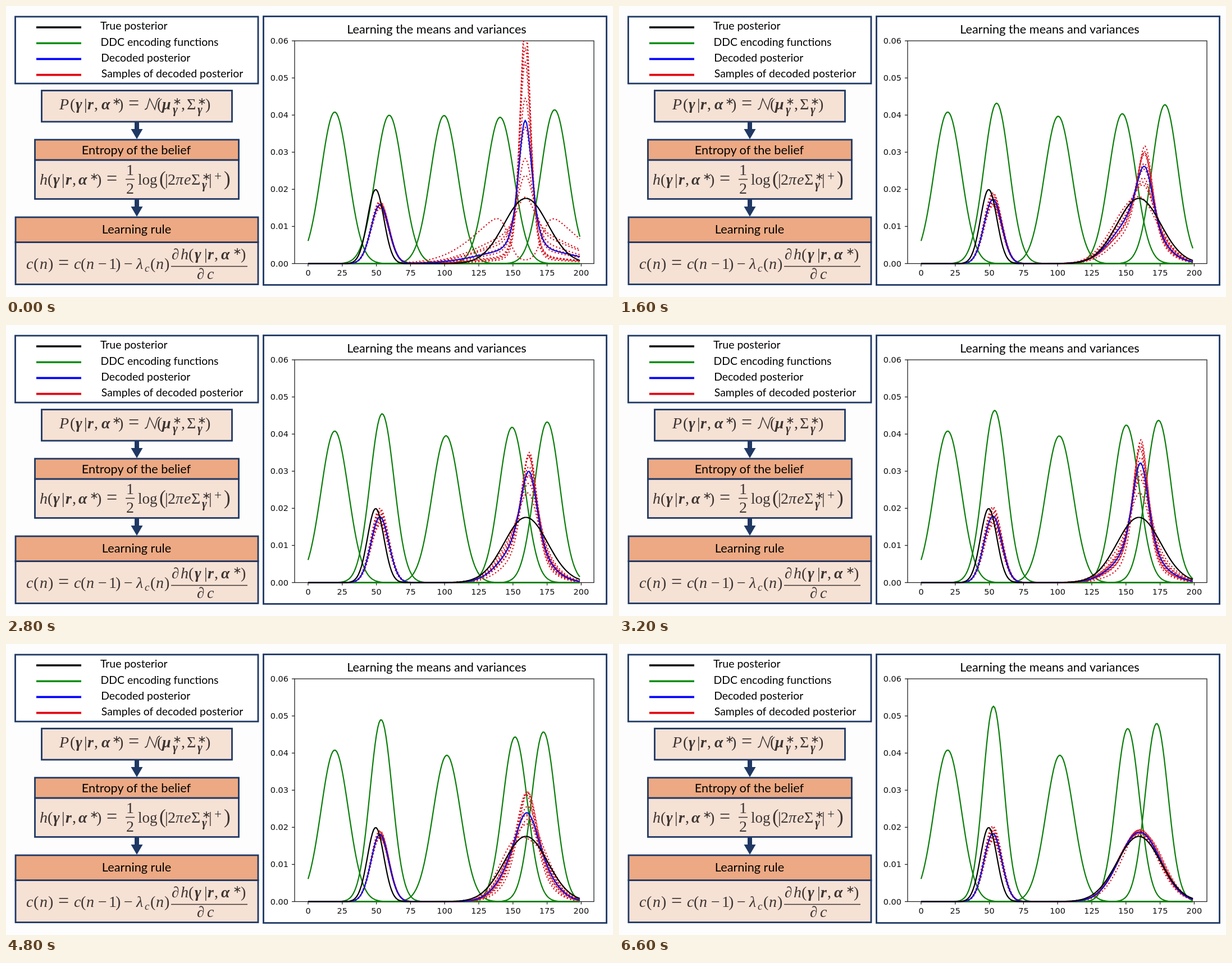
Recreate the animation shown at these times as an HTML page. Size 1081 px wide and 518 px high, loop 6.8 s.

```html
<!DOCTYPE html>
<html lang="en">
<head>
<meta charset="utf-8">
<title>Learning the means and variances</title>
<style>
  html, body { margin: 0; width: 100%; height: 100%; overflow: hidden; background: #fdfdfd; }
  svg { display: block; width: 100%; height: 100%; }
  .box { stroke: #1f3864; stroke-width: 2.8; }
  .pale { fill: #f6e1d5; }
  .head { fill: #eca983; }
  .label { font-family: Lato, sans-serif; font-size: 19.4px; }
  .title { font-family: Lato, sans-serif; font-size: 21.7px; text-anchor: middle; }
  .tick { font-family: "DejaVu Sans", sans-serif; font-size: 14.5px; fill: #111; }
  .math { font-family: "Liberation Serif", serif; fill: #3b3431; }
  .i { font-style: italic; }
  .b { font-style: italic; font-weight: bold; }
  .axis { fill: none; stroke: #222; stroke-width: 1.3; }
  .rule { fill: none; stroke: #3b3431; stroke-width: 1.5; }
  #curves path { fill: none; stroke-width: 2.2; stroke-linejoin: round; }
</style>
</head>
<body>
<svg id="stage" viewBox="0 0 1081 518" preserveAspectRatio="none">
  <defs><clipPath id="plotArea"><rect x="514" y="62" width="533" height="398"/></clipPath></defs>
  <rect class="box" x="16.5" y="19" width="432.5" height="119" fill="#fff"/>
  <rect class="box pale" x="63.5" y="150.5" width="339" height="55.5"/>
  <rect class="box pale" x="51.5" y="274" width="363" height="69.5"/>
  <rect class="box head" x="51.5" y="238" width="363" height="36"/>
  <rect class="box pale" x="17" y="420.5" width="432" height="75"/>
  <rect class="box head" x="17" y="376" width="432" height="44.5"/>
  <rect class="box" x="458.5" y="18.5" width="611" height="478" fill="#fff"/>
  <g fill="#1f3864">
    <path id="arrow" d="M229 206h8v13h6.500l-10.500 18l-10.500 -18h6.500z"/>
    <use href="#arrow" y="138"/>
  </g>
  <text class="title" x="767" y="49">Learning the means and variances</text>
  <text class="title" x="232" y="264">Entropy of the belief</text>
  <text class="title" x="232.500" y="405">Learning rule</text>
  <path class="rule" d="M213 308.500h16M294 463.500h136"/>
  <path class="rule" stroke-width="2" d="M247 184q4 0 5-5l4-14l9 19l4-15q1-4 5-5"/>
  <g id="legend"></g>
  <g id="formulas"></g>
  <g id="axes"><rect class="axis" x="514" y="62" width="533" height="396.500"/></g>
  <g id="curves" clip-path="url(#plotArea)"></g>
</svg>
<script>
const byId = id => document.getElementById(id);

function add(parent, tag, attributes, content = "") {
  const node = document.createElementNS("http://www.w3.org/2000/svg", tag);
  for (const name in attributes) node.setAttribute(name, attributes[name]);
  node.textContent = content;
  return byId(parent).appendChild(node);
}

// Legend
[["True posterior", "#000"], ["DDC encoding functions", "#0f9018"],
 ["Decoded posterior", "#00f"], ["Samples of decoded posterior", "#e3000f"]].forEach(([name, color], row) => {
  const y = 38 + row * 28.2;
  add("legend", "path", { d: `M54 ${y}h80`, stroke: color, "stroke-width": 3.6 });
  add("legend", "text", { class: "label", x: 168 + row * 0.6, y: y + 4.4 }, name);
});

// Formulas: each piece is [x, text, style, rise, size]
function formula(baseline, pieces) {
  for (const [x, text, style = "", rise = 0, size = 28] of pieces)
    add("formulas", "text", { class: "math " + style, x, y: baseline - rise, "font-size": size }, text);
}
const star = x => [x, "∗", "", 8, 19];
const gammaSub = x => [x, "γ", "b", -7, 21];

formula(184, [
  [95, "P", "i"], [114, "("], [124, "γ", "b"], [139, "|"], [145, "r", "b"], [157, ","],
  [170, "α", "b"], star(189), [200, ")"], [218, "=", "", 0, 34],
  [269, "("], [278, "μ", "b"], star(297), gammaSub(297), [312, ","],
  [322, "Σ"], star(341), gammaSub(341), [355, ")"]
]);
formula(318, [
  [60, "h", "i"], [74, "("], [84, "γ", "b"], [99, "|"], [106, "r", "b"], [118, ","],
  [129, "α", "b"], star(149), [161, ")"], [179, "=", "", 0, 34],
  [214, "1", "", 17], [214, "2", "", -16], [235, "log", "", 0, 27],
  [273, "(", "", -1, 35], [283, "|"], [288, "2"], [302, "π", "i"], [317, "e", "i"],
  [330, "Σ"], star(349), gammaSub(349), [361, "|"], [371, "+", "", 8, 23], [388, ")", "", -1, 35]
]);
formula(468, [
  [36, "c", "i"], [49, "("], [60, "n", "i"], [75, ")"], [93, "=", "", 0, 34],
  [121, "c", "i"], [133, "("], [143, "n", "i"], [164, "−"], [183, "1"], [195, ")"], [210, "−"],
  [232, "λ", "i"], [247, "c", "i", -5, 19], [257, "("], [267, "n", "i"], [282, ")"],
  [295, "∂", "", 17, 27], [311, "h", "i", 17], [325, "(", "", 17], [336, "γ", "b", 17],
  [353, "|", "", 17], [359, "r", "b", 17], [371, ",", "", 17], [383, "α", "b", 17],
  star(404).with(3, 25), [418, ")", "", 17],
  [340, "∂", "", -18, 27], [358, "c", "i", -18]
]);

// Axes
const plotX = x => 538 + x * 2.432;
const plotY = y => 458.5 - y * 6608;
for (let value = 0; value <= 200; value += 25) {
  const x = plotX(value);
  add("axes", "path", { class: "axis", d: `M${x} 458.5v5` });
  add("axes", "text", { class: "tick", x, y: 480, "text-anchor": "middle" }, value);
}
for (let step = 0; step <= 6; step++) {
  const y = plotY(step / 100);
  add("axes", "path", { class: "axis", d: `M514 ${y}h-5` });
  add("axes", "text", { class: "tick", x: 503, y: y + 5, "text-anchor": "end" }, (step / 100).toFixed(2));
}

// Densities on the grid 0..199
const grid = Array.from({ length: 200 }, (_, x) => x);
const bell = (x, mean, sd) => Math.exp(-((x - mean) ** 2) / (2 * sd * sd));
const scaled = (values, area) => {
  const factor = area / values.reduce((sum, v) => sum + v, 0);
  return values.map(v => v * factor);
};
const gaussian = (mean, sd, area = 1) => scaled(grid.map(x => bell(x, mean, sd)), area);
const mix = (a, b) => a.map((v, i) => v + b[i]);

// Wide bell times exp(gain * narrow bell); the gain is solved so the middle has the given height.
function tilted(height, center, width, mean, sd, area) {
  const shape = gain => scaled(grid.map(x => bell(x, mean, sd) * Math.exp(gain * bell(x, center, width))), area);
  let low = -5, high = 6;
  for (let i = 0; i < 18; i++) {
    const gain = (low + high) / 2;
    if (shape(gain)[Math.round(center)] < height) low = gain; else high = gain;
  }
  return shape(low);
}

function posterior(bump, height, key, shift = 0) {
  const bumpArea = bump * 6.5 * Math.sqrt(2 * Math.PI);
  return mix(gaussian(52.6, 6.5, bumpArea),
    tilted(height, key.center, key.width, key.mean + shift, key.sd, 1 - bumpArea));
}

// Motion keys, in steps of 200 ms
const STEP = 200, STEPS = 34;
const times = [0, 4, 11, 16, 20, 28, 33];
const encoders = [ // mean and width of the three adapting functions
  [59.4, 9.98, 140.6, 10.12, 180.5, 9.9],
  [56.1, 9.5, 146.4, 10.08, 180.9, 9.48],
  [54.7, 9.03, 148, 9.73, 176.8, 9.42],
  [53.9, 8.6, 150.3, 9.4, 173.9, 9.15],
  [53.7, 8.35, 151.5, 9.15, 172.5, 8.9],
  [53.2, 7.93, 151.6, 8.83, 172.2, 8.57],
  [53, 7.58, 151.3, 8.56, 172.5, 8.32]
];
const fields = ["bump", "bumpSpread", "peak", "low", "high", "center", "width", "mean", "sd", "shift"];
const beliefs = [
  [0.0158, 0.0010, 0.0386, 0.0010, 0.0660, 159, 7.5, 160, 30, 2],
  [0.0170, 0.0015, 0.0240, 0.0050, 0.0312, 165, 7.5, 158, 19, 1.5],
  [0.0175, 0.0019, 0.0266, 0.0238, 0.0312, 164.5, 7, 157, 14, 1],
  [0.0179, 0.0025, 0.0322, 0.0240, 0.0385, 161, 8, 158.5, 16.5, 2.5],
  [0.0181, 0.0006, 0.0285, 0.0200, 0.0380, 161, 8.5, 159.5, 14.5, 3],
  [0.0181, 0.0014, 0.0192, 0.0138, 0.0228, 160, 9, 160, 14.6, 2],
  [0.0183, 0.0020, 0.0187, 0.0179, 0.0194, 160, 9, 160, 14.9, 0.8]
];
const ranks = [1, 0.95, 0.88, 0.82, 0.67, 0.55, 0.42, 0.35, 0.26, 0];

const random = n => {
  const v = Math.sin(n * 127.1 + 11.7) * 43758.5453;
  return v - Math.floor(v);
};

function curve(color, dash = "none") {
  const node = add("curves", "path", { stroke: color, "stroke-dasharray": dash });
  return values => node.setAttribute("d", "M" + values.map((v, x) =>
    plotX(x).toFixed(2) + " " + plotY(v).toFixed(2)).join("L"));
}
const drawEncoders = Array.from({ length: 5 }, () => curve("#0a7f0a"));
const drawSamples = ranks.map(() => curve("#d8101c", "2.3 3.7"));
const drawDecoded = curve("#0c0ce0");
const drawTrue = curve("#000");
drawTrue(mix(gaussian(49.5, 6, 0.3), gaussian(159.5, 16, 0.7)));

function draw(step) {
  let k = 0;
  while (k < times.length - 2 && step >= times[k + 1]) k++;
  const part = (step - times[k]) / (times[k + 1] - times[k]);
  const between = table => table[k].map((v, i) => v + (table[k + 1][i] - v) * part);
  const key = Object.fromEntries(between(beliefs).map((v, i) => [fields[i], v]));
  const [m2, s2, m4, s4, m5, s5] = between(encoders);
  const drift = Math.min(1, step / 20);

  [[19.5, 10], [m2, s2], [99.6 + 2 * drift, 10 + 0.12 * drift], [m4, s4], [m5, s5]]
    .forEach(([mean, sd], i) => drawEncoders[i](gaussian(mean, sd)));

  const flicker = 0.15 * Math.sin(Math.PI * part);
  ranks.forEach((rank, i) => {
    const level = Math.max(0, rank + flicker * (random(step * 10 + i) - 0.5));
    const spread = 1 - 2 * ((i * 7) % 10) / 9;
    const shift = key.shift * (1 - 2 * ((i * 3) % 10) / 9);
    drawSamples[i](posterior(key.bump + key.bumpSpread * spread,
      key.low + (key.high - key.low) * level, key, shift));
  });
  drawDecoded(posterior(key.bump, key.peak, key));
}

let shown = -1;
const start = performance.now();
function tick(now) {
  const step = Math.floor(Math.max(0, now - start) / STEP) % STEPS;
  if (step !== shown) draw(shown = step);
  requestAnimationFrame(tick);
}
tick(start);
</script>
</body>
</html>
```
